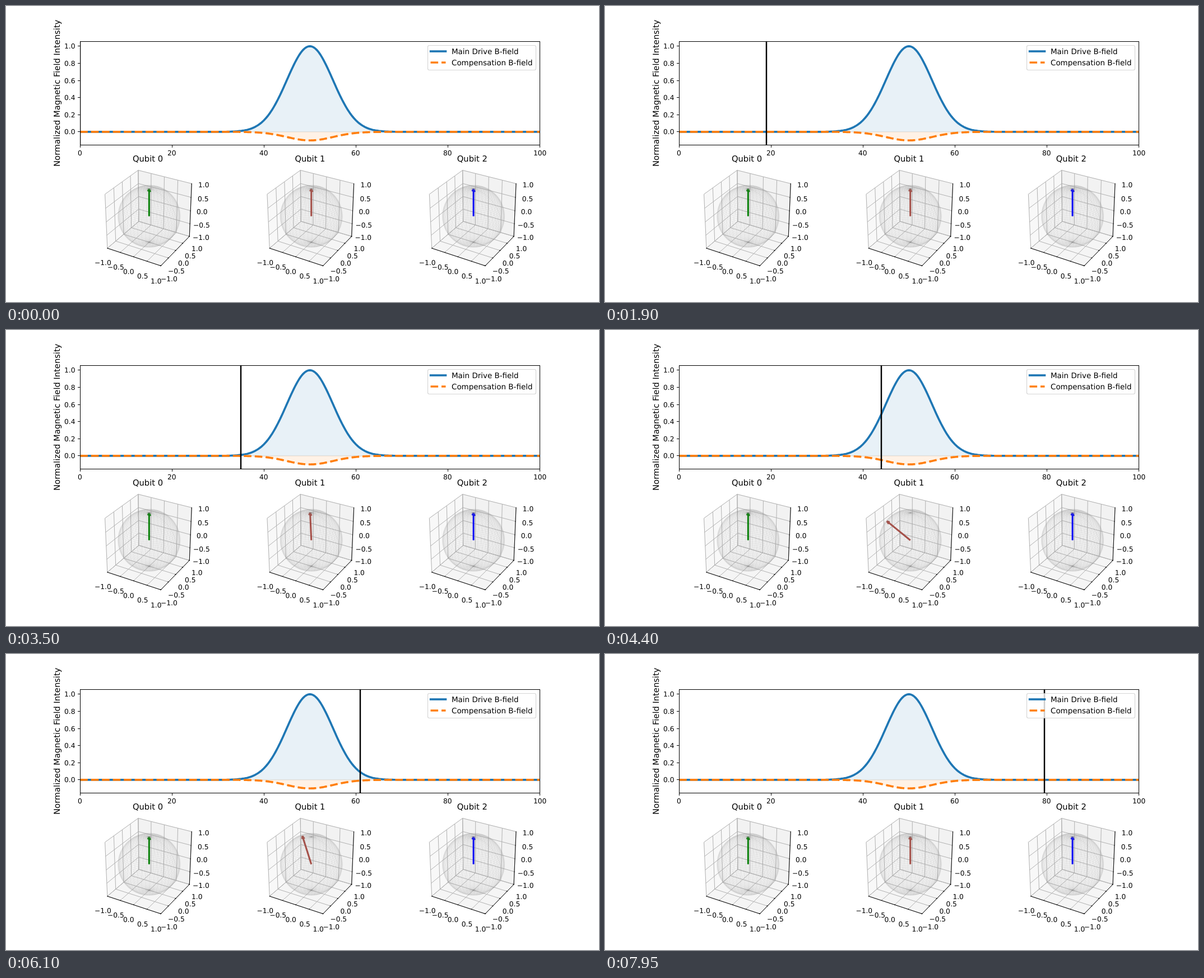
An HTML page with a canvas for the animation above (8000 ms loop, 1058 by 529 pixels).

```html
<!DOCTYPE html>
<html>
<head>
<meta charset="utf-8">
<style>
html, body { margin: 0; width: 100%; height: 100%; overflow: hidden; background: #fff; }
canvas { display: block; }
</style>
</head>
<body>
<canvas id="stage" width="1058" height="529"></canvas>
<script>
const ctx = document.getElementById('stage').getContext('2d');
const PT = 1058 / 12 / 72;
const LOOP = 8000, STEP = 50;
const BLUE = '#1f77b4', ORANGE = '#ff7f0e';
const TICKS = [-1, -0.5, 0, 0.5, 1];
const ALIGN = { left: 0, center: 0.5, right: 1 };

// Text is centred on y by its digit height and placed on whole pixels.
function text(str, x, y, pt = 10, align = 'center') {
  ctx.font = `${pt * PT}px "DejaVu Sans", sans-serif`;
  ctx.textRendering = 'geometricPrecision';
  ctx.fillStyle = '#000';
  const left = x - ctx.measureText(str).width * ALIGN[align];
  ctx.fillText(str, Math.round(left), Math.round(y + pt * PT * 0.365));
}

function trace(points, closed) {
  ctx.beginPath();
  points.forEach(p => ctx.lineTo(p[0], p[1]));
  if (closed) ctx.closePath();
}

function stroke(points, color, width, dash = []) {
  trace(points);
  ctx.strokeStyle = color;
  ctx.lineWidth = width * PT;
  ctx.setLineDash(dash.map(d => d * width * PT));
  ctx.stroke();
  ctx.setLineDash([]);
}

const label = v => v.toFixed(1).replace('-', '\u2212');

// ---- field plot ----
const LEFT = 132.25, RIGHT = 952.2, TOP = 63.48, BOTTOM = 248.63;
const px = t => LEFT + (RIGHT - LEFT) * t / 100;
const py = v => TOP + (BOTTOM - TOP) * (1.055 - v) / 1.21;
const pulse = t => Math.exp(-((t - 50) ** 2) / 50);
const curve = amp => Array.from({ length: 401 }, (_, i) => [px(i / 4), py(amp * pulse(i / 4))]);
const mainCurve = curve(1), compCurve = curve(-0.1);

function area(points, color) {
  trace([...points, [RIGHT, py(0)], [LEFT, py(0)]], true);
  ctx.globalAlpha = 0.1;
  ctx.fillStyle = ctx.strokeStyle = color;
  ctx.lineWidth = PT;
  ctx.fill();
  ctx.stroke();
  ctx.globalAlpha = 1;
}

function drawLegend() {
  ctx.beginPath();
  ctx.roundRect(752.5, 70.5, 193, 44, 2.7);
  ctx.fillStyle = 'rgba(255,255,255,.8)';
  ctx.fill();
  ctx.strokeStyle = 'rgba(204,204,204,.8)';
  ctx.lineWidth = PT;
  ctx.stroke();
  stroke([[755.8, 81], [786.3, 81]], BLUE, 3);
  stroke([[757.5, 101], [784.5, 101]], ORANGE, 3, [3.7, 1.6]);
  text('Main Drive B-field', 795.2, 81.5, 11, 'left');
  text('Compensation B-field', 795.2, 101, 11, 'left');
}

function drawPlot(now) {
  ctx.save();
  ctx.beginPath();
  ctx.rect(LEFT, TOP, RIGHT - LEFT, BOTTOM - TOP);
  ctx.clip();
  area(mainCurve, BLUE);
  area(compCurve, ORANGE);
  stroke(mainCurve, BLUE, 3);
  stroke(compCurve, ORANGE, 3, [3.7, 1.6]);
  const x = Math.round(px(now));
  stroke([[x, TOP], [x, BOTTOM]], '#000', 2);
  ctx.restore();

  ctx.strokeStyle = '#000';
  ctx.lineWidth = 1;
  ctx.strokeRect(132.5, 63.5, 820, 185);
  for (let i = 0; i <= 5; i++) {
    const x = Math.floor(px(i * 20)) + 0.5, y = Math.floor(py(i / 5)) + 0.5;
    stroke([[x, 249], [x, 253]], '#000', 0.8);
    stroke([[128, y], [132, y]], '#000', 0.8);
    text(i * 20, px(i * 20), 263);
    text(label(i / 5), 123.7, py(i / 5), 10, 'right');
  }
  ctx.save();
  ctx.translate(91, 156);
  ctx.rotate(-Math.PI / 2);
  text('Normalized Magnetic Field Intensity', 0, 0, 12);
  ctx.restore();
  drawLegend();
}

// ---- Bloch spheres: perspective view, elevation 30, azimuth -60 ----
function project([x, y, z]) {
  const right = 0.866 * x + 0.5 * y;
  const up = -0.25 * x + 0.433 * y + 0.866 * z;
  const near = 0.433 * x - 0.75 * y + 0.5 * z;
  const s = 55.05 / (1 - 0.055 * near);
  return [255.33 + s * right, 375.73 - s * up];
}
const line3 = (points, color, width) => stroke(points.map(project), color, width);

const ring = f => Array.from({ length: 73 }, (_, i) => project(f(i / 72)));
const onSphere = (u, v) => [Math.cos(u) * Math.sin(v), Math.sin(u) * Math.sin(v), Math.cos(v)];
const wires = [];
for (let i = 0; i < 50; i++) {
  const k = i / 49;
  wires.push(ring(s => onSphere(2 * Math.PI * k, Math.PI * s)));
  wires.push(ring(s => onSphere(2 * Math.PI * s, Math.PI * k)));
}

function drawBox() {
  const panes = [
    ['rgba(242,242,242,.5)', (a, b) => [-1, a, b]],
    ['rgba(230,230,230,.5)', (a, b) => [a, 1, b]],
    ['rgba(236,236,236,.5)', (a, b) => [a, b, -1]]
  ];
  for (const [color, at] of panes) {
    trace([at(-1, -1), at(1, -1), at(1, 1), at(-1, 1)].map(project), true);
    ctx.fillStyle = ctx.strokeStyle = color;
    ctx.lineWidth = PT;
    ctx.fill();
    ctx.stroke();
  }
  for (const [, at] of panes)
    for (const v of TICKS) {
      line3([at(v, -1), at(v, 1)], '#b0b0b0', 0.8);
      line3([at(-1, v), at(1, v)], '#b0b0b0', 0.8);
    }
  // Each axis: point at value v, pushed outward by a (tick) and b (label only).
  const axes = [
    (v, a, b) => [v, -1 - a, -1 - b],
    (v, a, b) => [1 + a, v, -1 - b],
    (v, a, b) => [1 + b, 1 + a, v]
  ];
  for (const at of axes) {
    line3([at(-1, 0, 0), at(1, 0, 0)], '#000', 0.8);
    for (const v of TICKS) {
      line3([at(v, -0.032, 0), at(v, 0.016, 0)], '#000', 0.8);
      const [x, y] = project(at(v, 0.29, 0.29));
      text(label(v), x, y + 4.85);
    }
  }
}

function drawArrow(tilt, color) {
  const polar = (r, a) => [-r * Math.sin(a), 0, r * Math.cos(a)];
  const tip = polar(1, tilt);
  line3([[0, 0, 0], tip], color, 2.5);
  for (const side of [-1, 1]) line3([tip, polar(0.9, tilt + side * 0.05)], color, 2.5);
}

function drawQubit(i, color, tilt) {
  ctx.save();
  ctx.translate(289.39 * i, 0);
  text('Qubit ' + i, 252.83, 273, 12);
  drawBox();
  drawArrow(tilt, color);
  for (const w of wires) stroke(w, 'rgba(128,128,128,.05)', 1.5);
  ctx.restore();
}

function draw(now) {
  ctx.fillStyle = '#fff';
  ctx.fillRect(0, 0, 1058, 529);
  drawPlot(now);
  // The driven spin follows the direction of the total field.
  const tilt = Math.atan(3.9 * pulse(now));
  drawQubit(0, 'green', 0);
  drawQubit(1, '#a84c44', tilt);
  drawQubit(2, 'blue', 0);
}

let shown = -1;
function tick() {
  const step = Math.floor(performance.now() % LOOP / STEP);
  if (step !== shown) draw((shown = step) * STEP / 100);
  requestAnimationFrame(tick);
}
tick();
</script>
</body>
</html>
```
